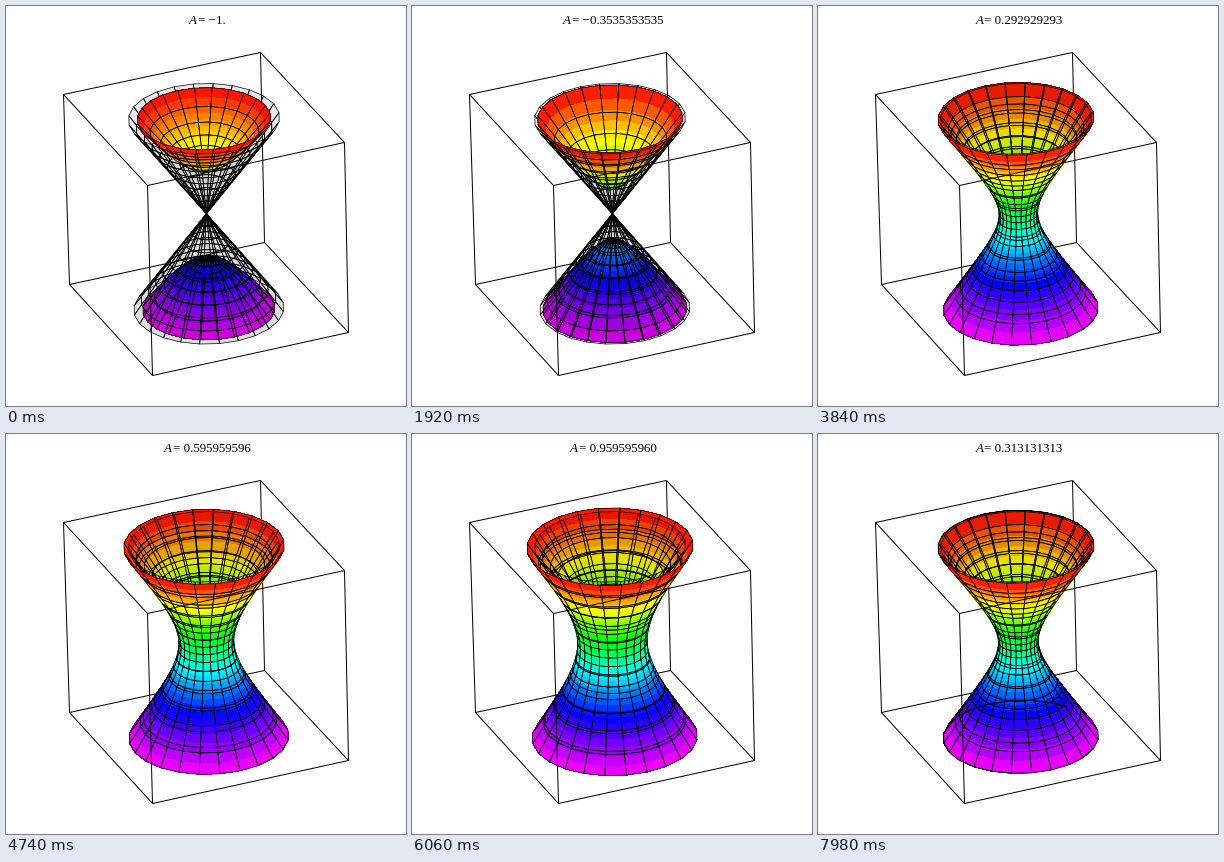
These frames come from a looping animation (400x400 px, 8000 ms). A matplotlib script:

```python
import numpy as np
import matplotlib.pyplot as plt
from matplotlib.animation import FuncAnimation
from matplotlib.collections import LineCollection, PolyCollection
from matplotlib.colors import hsv_to_rgb
from matplotlib.offsetbox import AnnotationBbox, HPacker, TextArea

SIZE, DPI = 400, 100
PX = 72 / DPI
TICK, HOLD, LOOP = 20, 60, 8000
LAST = 99                      # steps from A = -1 to A = 1
SEGMENTS = 24
THETA = np.linspace(0, 2 * np.pi, SEGMENTS + 1)
BLACK, CLEAR = (0, 0, 0, 1), (0, 0, 0, 0)

# Box corners on screen, going round from (-1, -1) to (-1, 1)
TOP = np.array([(57, 88), (254, 46), (338, 136), (141, 179)]) + 0.5
BOTTOM = np.array([(63, 278), (258, 236), (342, 326), (146, 369)]) + 0.5


def project(x, y, z):
    """Map box coordinates in [-1, 1] to screen pixels."""
    w = np.stack([(1 - x) * (1 - y), (1 + x) * (1 - y),
                  (1 + x) * (1 + y), (1 - x) * (1 + y)], axis=-1) / 4
    t = ((1 + z) / 2)[..., None]
    return t * (w @ TOP) + (1 - t) * (w @ BOTTOM)


def mesh(z, a):
    """Quads of x^2 + y^2 - z^2 = a, their mid heights and facing."""
    r = np.sqrt(np.maximum(z ** 2 / 2 + a / 9, 0))[:, None]
    x, y = r * np.cos(THETA), r * np.sin(THETA)
    p = project(x, y, np.broadcast_to(z[:, None], x.shape))
    quads = np.stack([p[:-1, :-1], p[:-1, 1:], p[1:, 1:], p[1:, :-1]], axis=2)
    quads = quads.reshape(-1, 4, 2)
    d1 = quads[:, 2] - quads[:, 0]
    d2 = quads[:, 3] - quads[:, 1]
    front = d1[:, 0] * d2[:, 1] - d1[:, 1] * d2[:, 0] > 0
    return quads, np.repeat((z[:-1] + z[1:]) / 2, SEGMENTS), front


def hue_colors(z):
    low = np.maximum(-z, 0)
    hue = 150 - 150 * z + 35 * low * (1 - low)
    one = np.ones_like(z)
    rgb = hsv_to_rgb(np.stack([hue / 360, one, one], axis=-1))
    return np.column_stack([rgb, one])


def layer(quads, face, edge, smooth, front):
    n = len(quads)
    return (quads, np.broadcast_to(face, (n, 4)),
            np.broadcast_to(edge, (n, 4)), np.full(n, smooth), front)


def fill(z, a):
    quads, mid, front = mesh(z, a)
    return layer(quads, hue_colors(mid), CLEAR, False, front)


def grid(z, a):
    quads, _, front = mesh(z, a)
    return layer(quads, CLEAR, BLACK, True, front)


def glass_cone():
    quads, mid, front = mesh(np.linspace(-1, 1, 21), 0)
    rgba = np.zeros((len(mid), 4))
    rgba[:, 3] = np.where(mid > 0, 0.09, np.where(front, 0.13, 0.02))
    return layer(quads, rgba, BLACK, True, front)


def side(layers, front):
    """Keep the faces turned to the viewer, or those turned away."""
    return [[part[facing == front] for part in parts]
            for *parts, facing in layers]


CONE = [glass_cone()]


def scene(a):
    """All quads in painting order with faces, edges and smoothing."""
    h = np.sqrt(abs(a) / 4.5)
    if a < 0:
        end = np.arccosh(1 / h)
        fine = h * np.cosh(np.linspace(0, end, 19))
        rows = h * np.cosh(np.linspace(0, end, 9))
        sheet = [fill(-fine[::-1], a), fill(fine, a),
                 grid(-rows[::-1], a), grid(rows, a)]
        order = (side(CONE, False) + side(sheet, False)
                 + side(sheet, True) + side(CONE, True))
    else:
        end = np.arcsinh(1 / h)
        fine = h * np.sinh(np.linspace(-end, end, 41))
        rows = h * np.sinh(np.linspace(-end, end, 17))
        sheet = [fill(fine, a), grid(np.union1d(rows, np.linspace(-1, 1, 13)), a)]
        order = (side(sheet, False) + side(CONE, False)
                 + side(CONE, True) + side(sheet, True))
    return [np.concatenate(part) for part in zip(*order)]


def label(a):
    if abs(a) > 0.9999:
        number = f"{a:.0f}."
    else:
        number = f"{a:.{10 if a < 0 else 9}f}"
    return "= " + number.replace("-", "\u2212")


fig = plt.figure(figsize=(SIZE / DPI, SIZE / DPI), dpi=DPI, facecolor="white")
ax = fig.add_axes([0, 0, 1, 1])
ax.set(xlim=(0, SIZE), ylim=(SIZE, 0))
ax.axis("off")

back, front = [], []
for i in range(4):
    j = (i + 1) % 4
    front.append([TOP[i], TOP[j]])
    # corner 1 is the far one
    (back if 1 in (i, j) else front).append([BOTTOM[i], BOTTOM[j]])
    (back if i == 1 else front).append([TOP[i], BOTTOM[i]])

for lines, order in ((back, 1), (front, 3)):
    ax.add_collection(LineCollection(lines, colors="black", linewidths=PX,
                                     zorder=order))

surface = PolyCollection(np.zeros((1, 4, 2)), linewidths=0.7 * PX, zorder=2)
ax.add_collection(surface, autolim=False)

font = dict(family="Liberation Serif", size=13 * PX)
value = TextArea("", textprops=font)
name = TextArea("A", textprops=dict(font, style="italic"))
row = HPacker(children=[name, value], align="baseline", pad=0, sep=PX)
ax.add_artist(AnnotationBbox(row, (201, 20.5), frameon=False, pad=0,
                             box_alignment=(0.5, 0)))
shown = {"step": None}


def update(frame):
    step = frame * TICK // HOLD
    step = min(step, 2 * LAST - step)
    if step != shown["step"]:
        shown["step"] = step
        a = -1 + 2 * step / LAST
        quads, faces, edges, smooth = scene(a)
        surface.set_verts(quads)
        surface.set_facecolor(faces)
        surface.set_edgecolor(edges)
        surface.set_antialiased(smooth)
        value.set_text(label(a))
    return surface, row


anim = FuncAnimation(fig, update, frames=LOOP // TICK, interval=TICK,
                     init_func=lambda: update(0), repeat=True,
                     repeat_delay=0, cache_frame_data=False)
plt.show()
```
